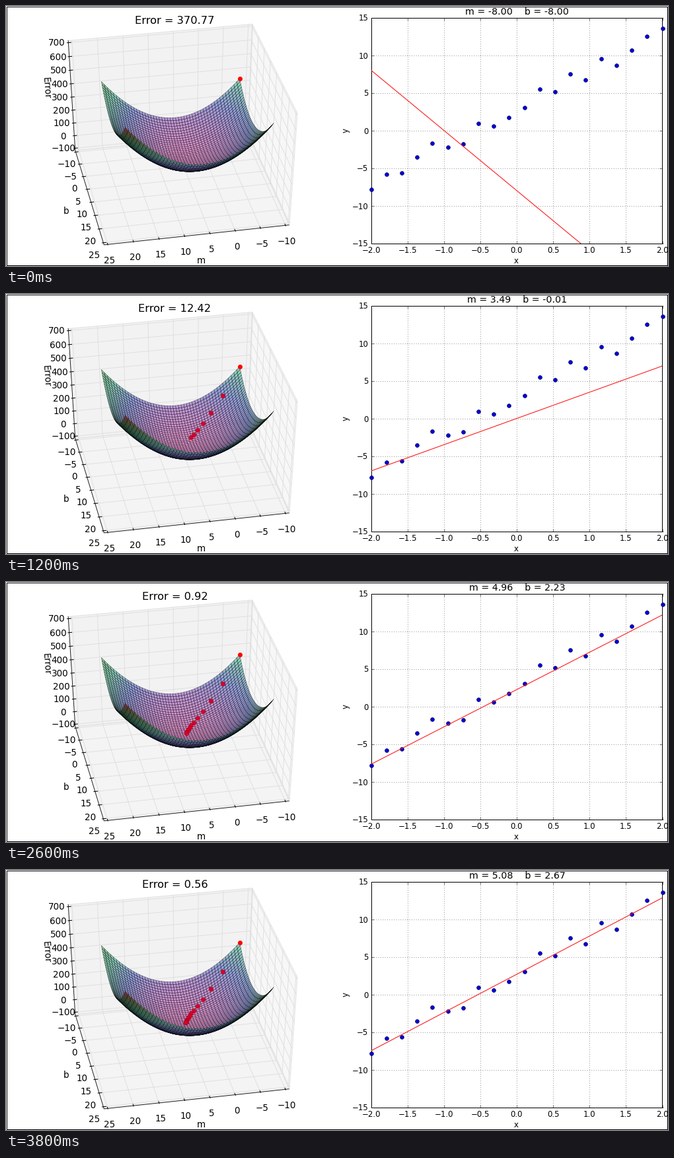
These frames come from a looping animation (1002 by 394 pixels, 4000 ms). A matplotlib script:

```python
import numpy as np
import matplotlib.pyplot as plt
from matplotlib.animation import FuncAnimation
from matplotlib.collections import LineCollection, PolyCollection
from matplotlib.colors import LinearSegmentedColormap
from matplotlib.patches import Rectangle

W, H, DPI = 1002, 394, 64
PX = 72 / DPI  # points per pixel
STEPS, LOOP_MS = 20, 4000

plt.rcParams["font.family"] = "DejaVu Sans"

# Data to fit, and gradient descent in closed form
x = np.linspace(-2, 2, 20)
y = np.array([-7.81, -5.83, -5.70, -3.51, -1.75, -2.24, -1.84, 0.92, 0.53, 1.67,
              3.07, 5.44, 5.13, 7.50, 6.67, 9.56, 8.68, 10.70, 12.46, 13.51])
BEST_M, BEST_B, NOISE = 5.1018, 2.8290, 0.535
START, RATE = -8, 0.1
X2 = np.mean(x ** 2)


def error(m, b):
    return X2 * (m - BEST_M) ** 2 + (b - BEST_B) ** 2 + NOISE


k = np.arange(STEPS)
path_m = BEST_M + (START - BEST_M) * (1 - 2 * RATE * X2) ** k
path_b = BEST_B + (START - BEST_B) * (1 - 2 * RATE) ** k
path_e = error(path_m, path_b)

# Perspective camera for the 3D panel
AZIM, ELEV, DIST = np.radians(78.8), np.radians(40.2), 10
CENTER, SCALE = (261.2, 191.7), (273.2, 211.2)
LOW = np.array([-10, -10, -100])
SPAN = np.array([35, 35, 800])


def project(m, b, z):
    """Return stage x, stage y and distance from the eye."""
    p, q, r = ((np.asarray(v, float) - lo) / s - 0.5
               for v, lo, s in zip((m, b, z), LOW, SPAN))
    ca, sa, ce, se = np.cos(AZIM), np.sin(AZIM), np.cos(ELEV), np.sin(ELEV)
    flat = ca * p + sa * q
    depth = DIST - ce * flat - se * r
    sx = CENTER[0] + SCALE[0] * DIST * (ca * q - sa * p) / depth
    sy = CENTER[1] - SCALE[1] * DIST * (ce * r - se * flat) / depth
    return sx, sy, depth


def spot(m, b, z):
    return project(m, b, z)[:2]


fig = plt.figure(figsize=(W / DPI, H / DPI), dpi=DPI, facecolor="white")
stage = fig.add_axes([0, 0, 1, 1])
stage.set(xlim=(-0.5, W - 0.5), ylim=(H - 0.5, -0.5))
stage.axis("off")


def label(px, py, text, size, **kw):
    """Place text with its capital height centred on py."""
    return stage.text(px, py + 0.365 * size, text, fontsize=size * PX,
                      ha="center", va="baseline", **kw)


def lines(segments, color, width, z):
    stage.add_collection(LineCollection(segments, colors=color,
                                        linewidths=width * PX, zorder=z))


# Panes, grid, axes and ticks of the box
(m0, b0, z0), (m1, b1, z1) = LOW - SPAN / 48, LOW + SPAN * 49 / 48
panes = [
    ([(m0, b0, z0), (m0, b1, z0), (m0, b1, z1), (m0, b0, z1)], 0.968),
    ([(m0, b0, z0), (m1, b0, z0), (m1, b0, z1), (m0, b0, z1)], 0.95),
    ([(m0, b0, z0), (m1, b0, z0), (m1, b1, z0), (m0, b1, z0)], 0.957),
]
for corners, gray in panes:
    stage.add_collection(PolyCollection([[spot(*c) for c in corners]],
                                        facecolors=str(gray), edgecolors="0.87",
                                        linewidths=0.9 * PX, zorder=1))

SMALL = 13.5
flat_ticks = range(-10, 26, 5)
z_ticks = range(-100, 701, 100)
out_m, in_m = m1 + 35 / 120, m1 - 35 / 60
out_b, in_b = b1 + 35 / 120, b1 - 35 / 60
grid, marks = [], []


def text_at(pos, dx, dy, value):
    label(pos[0] + dx, pos[1] + dy, str(value).replace("-", "\u2212"), SMALL)


for t in flat_ticks:
    grid.append([spot(t, b1, z0), spot(t, b0, z0), spot(t, b0, z1)])
    grid.append([spot(m1, t, z0), spot(m0, t, z0), spot(m0, t, z1)])
    marks.append([spot(t, out_b, z0), spot(t, in_b, z0)])
    marks.append([spot(out_m, t, z0), spot(in_m, t, z0)])
    text_at(spot(t, b1, z0), 2.2, 23.3, t)
    text_at(spot(m1, t, z0), -13.7, 18, t)
for t in z_ticks:
    grid.append([spot(m1, b0, t), spot(m0, b0, t), spot(m0, b1, t)])
    marks.append([spot(out_m, b0, t), spot(in_m, b0, t)])
    text_at(spot(m1, b0, t), -17.3, 0, t)

edges = [[spot(m1, b0, z1), spot(m1, b0, z0), spot(m1, b1, z0), spot(m0, b1, z0)]]
lines(grid, "0.87", 0.9, 2)
lines(edges, "0.1", 0.9, 3)
lines(marks, "black", 1, 3)
label(295, 385, "m", SMALL)
label(91, 310, "b", SMALL)
stage.text(60, 124, "Error", fontsize=SMALL * PX, rotation=-86,
           ha="center", va="center")

# Error surface, far cells first
g = np.linspace(-8, 20, 50)
gm, gb = np.meshgrid(g, g)
ge = error(gm, gb)
verts = np.dstack(project(gm, gb, ge) + (ge,))
cells = np.stack([verts[:-1, :-1], verts[:-1, 1:], verts[1:, 1:], verts[1:, :-1]],
                 axis=2).reshape(-1, 4, 4)
cells = cells[np.argsort(-cells[:, :, 2].mean(axis=1))]
ramp = LinearSegmentedColormap.from_list("ramp", [
    (0.00, (0.80, 0.33, 0.68)),
    (0.16, (0.62, 0.36, 0.76)),
    (0.34, (0.36, 0.43, 0.82)),
    (0.55, (0.31, 0.74, 0.60)),
    (0.72, (0.24, 0.62, 0.28)),
    (0.85, (0.38, 0.42, 0.14)),
    (1.00, (0.72, 0.08, 0.08)),
])
faces = ramp(cells[:, :, 3].mean(axis=1) / ge.max())
faces[:, 3] = 0.6
stage.add_collection(PolyCollection(cells[:, :, :2], facecolors=faces,
                                    edgecolors=(0, 0, 0, 0.6),
                                    linewidths=0.5 * PX, zorder=4))

# Descent trail
trail_x, trail_y, _ = project(path_m, path_b, path_e)
trail, = stage.plot([], [], "o", ms=6.4 * PX, mfc="#d4042a", mec="#b00020",
                    mew=0.5 * PX, zorder=5)
stage.plot(trail_x[:1], trail_y[:1], "o", ms=7 * PX, color="red", mew=0, zorder=6)

# Fit panel
fit = fig.add_axes([552.5 / W, 1 - 359.5 / H, 441 / W, 342 / H])
fit.set(xlim=(-2, 2), ylim=(-15, 15),
        xticks=np.arange(-2, 2.1, 0.5), yticks=np.arange(-15, 16, 5))
fit.tick_params(direction="in", top=True, right=True, length=4 * PX,
                width=0.5 * PX, pad=4 * PX, labelsize=11.8 * PX)
fit.grid(color="0.25", lw=0.6 * PX, ls=(0, (1.6, 4)))
fit.set_axisbelow(True)
for side in fit.spines.values():
    side.set_linewidth(PX)
fit.plot(x, y, "o", ms=6 * PX, mfc="#0000d8", mec="#000030", mew=0.5 * PX,
         clip_on=False, zorder=3)
line, = fit.plot([], [], color="#ff1a1a", lw=1.1 * PX, zorder=4)
label(772, 385, "x", 11.8)
stage.text(514, 188, "y", fontsize=11.8 * PX, rotation=90, ha="center", va="center")

error_title = label(255, 20.5, "", 16.2)
fit_title = label(773, 7, "", 14.2)
stage.add_patch(Rectangle((0, 0), W - 1, H - 1, fill=False, ec="black", lw=PX,
                          zorder=9))


def update(i):
    m, b = path_m[i], path_b[i]
    trail.set_data(trail_x[1:i + 1], trail_y[1:i + 1])
    ends = np.array([-2, 2])
    line.set_data(ends, m * ends + b)
    error_title.set_text(f"Error = {path_e[i]:.2f}")
    fit_title.set_text(f"m = {m:.2f}    b = {b:.2f}")
    return trail, line, error_title, fit_title


anim = FuncAnimation(fig, update, frames=STEPS, interval=LOOP_MS / STEPS,
                     repeat=True, repeat_delay=0, blit=False)
plt.show()
```
